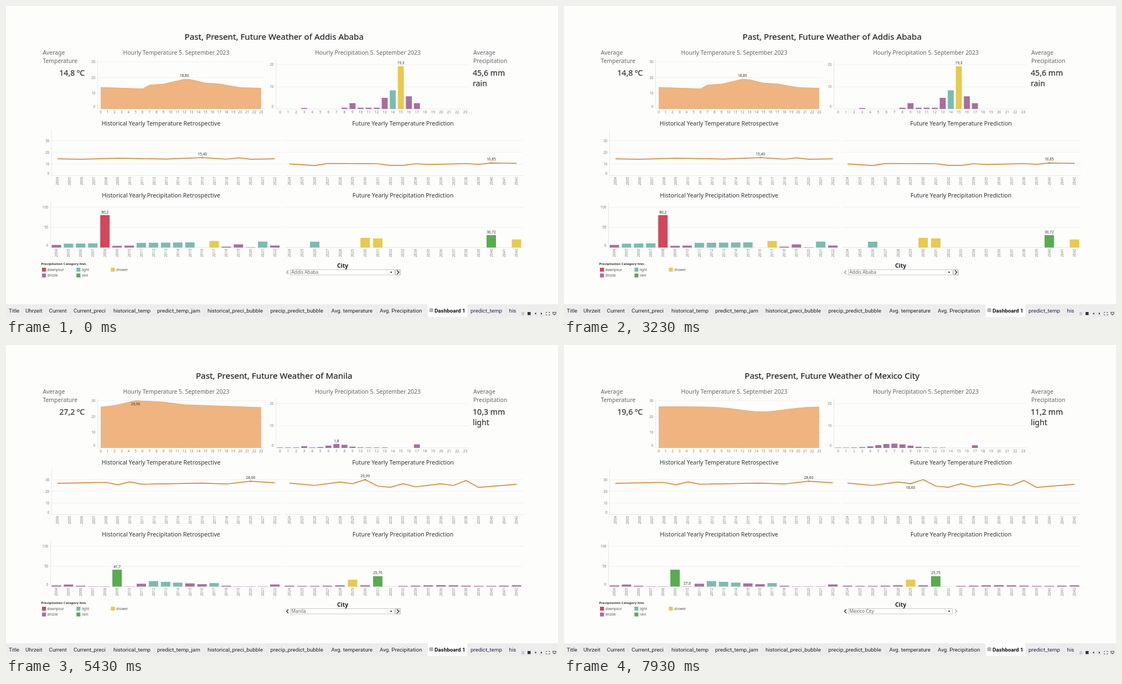
Write an HTML page that moves like this. It is 997 px wide and 562 px high and loops after 8000 ms.

```html
<!DOCTYPE html>
<html lang="en">
<head>
<meta charset="utf-8">
<title>Weather dashboard</title>
<style>
  html, body { margin: 0; width: 100%; height: 100%; overflow: hidden; background: #fdfdfc; }
  svg { display: block; width: 100%; height: 100%; }
  text { font-family: "Noto Sans", "Open Sans", sans-serif; fill: #333; }
  .title { font-size: 15.2px; fill: #222; stroke: #222; stroke-width: .2; }
  .head { font-size: 10.5px; }
  .soft { font-size: 10.35px; fill: #666; }
  .big { font-size: 14.2px; stroke: #333; stroke-width: .2; }
  .axis { font-size: 6.4px; fill: #808080; }
  .mark { font-size: 6.5px; }
  .legend { font-size: 6.2px; fill: #555; }
  .caption { font-size: 6px; font-weight: 600; }
  .bold { font-size: 10.3px; font-weight: 600; fill: #222; }
  .city { font-size: 8.3px; fill: #666; }
  .tab { font-family: Roboto, "Liberation Sans", sans-serif; font-size: 9.8px; fill: #222; }
  .active { font-weight: 700; fill: #111; }
  .blue { fill: #26264a; }
  .mid { text-anchor: middle; }
  .end { text-anchor: end; }
  .grid { stroke: #f0f0f2; }
  .base { stroke: #e8e8ea; }
  .line { fill: none; stroke: #de8a35; stroke-width: 1.7; stroke-linejoin: round; }
  .edge { fill: none; stroke: #eda866; }
</style>
</head>
<body>
<svg id="stage" viewBox="0 0 997 562"></svg>
<script>
const stage = document.getElementById('stage');
const LOOP = 8000;
const FIRST = 3420, SECOND = 3610, SETTLED = 3910, NEXT = 7800;
const HOURS = 24, YEARS = 19;
const COLORS = {
  drizzle: [168, 111, 158], light: [122, 188, 176], shower: [231, 202, 79],
  rain: [88, 173, 80], downpour: [209, 71, 91]
};
const rgb = c => `rgb(${c.map(Math.round)})`;

function add(tag, attrs, parent = stage) {
  const node = document.createElementNS('http://www.w3.org/2000/svg', tag);
  set(node, attrs);
  return parent.appendChild(node);
}
function set(node, attrs) {
  for (const key in attrs) node.setAttribute(key, attrs[key]);
}
function text(x, y, content, cls, extra = {}) {
  const node = add('text', { x, y, class: cls, ...extra });
  node.textContent = content;
  return node;
}
const rect = (x, y, width, height, fill, extra = {}) =>
  add('rect', { x, y, width, height, fill, ...extra });
const hline = (x1, x2, y, cls = 'grid') => add('path', { d: `M${x1} ${y}H${x2}`, class: cls });
const vline = (x, y1, y2, cls = 'base') => add('path', { d: `M${x} ${y1}V${y2}`, class: cls });
const stroke = (d, color, width = 1) => add('path', { d, fill: 'none', stroke: color, 'stroke-width': width });

const lerp = (a, b, p) => a + (b - a) * p;
const ease = p => p * p * (3 - 2 * p);
const progress = (t, start, end) => ease(Math.min(1, Math.max(0, (t - start) / (end - start))));
const current = (steps, t) => steps.filter(s => s[0] <= t).pop();
const bell = (x, center, width) => Math.exp(-(((x - center) / width) ** 2));

// A rule for every index, with a few standout values.
const series = (n, rule, peaks = {}) => Array.from({ length: n }, (_, i) => peaks[i] ?? rule(i));

// Straight runs between the turning points {index: value}.
function curve(n, points) {
  const keys = Object.keys(points).map(Number);
  return series(n, i => {
    const b = keys.find(k => k > i), a = keys.filter(k => k < i).pop();
    return lerp(points[a], points[b], (i - a) / (b - a));
  }, points);
}

function category(v) {
  if (v < 8.2) return COLORS.drizzle;
  if (v < 16) return COLORS.light;
  if (v < 25) return COLORS.shower;
  return v < 50 ? COLORS.rain : COLORS.downpour;
}

const hourX = { x: 171, step: 12.6 }, rainX = { x: 495, step: 14.54 };
const pastX = { x: 93, step: 21.8 }, pastBarX = { x: 91, step: 21.92 };
const futureX = { x: 512, step: 22.78 };
const hourlyMoves = [[FIRST, FIRST + 300], [NEXT, 7930]];
const ABOVE_BAR = -5.8, ABOVE_LINE = -6.6;

// moves: [start, end] of each change to the next row; labels: [time, index, text, offset]
const charts = [
  {
    kind: 'area', ...hourX, base: 186, unit: 2.84,
    rows: [
      curve(HOURS, { 0: 13.7, 6: 12.8, 7: 15.2, 9: 15.8, 12: 18.9, 13: 18.6, 15: 16.5, 17: 15.9, 20: 13.6, 23: 13.2 }),
      curve(HOURS, { 0: 26, 2: 27, 5: 30.1, 9: 29.2, 12: 27.5, 23: 25.7 }),
      series(HOURS, h => 26.2 - 3.2 * bell(h, 14.8, 4.5))
    ],
    moves: hourlyMoves,
    labels: [[0, 12, '18,80', -7], [FIRST], [SETTLED, 5, '29,90', 5.8], [NEXT]]
  },
  {
    kind: 'bars', ...rainX, base: 186, unit: 4, width: 10.8,
    rows: [
      series(HOURS, h => h > 7 && h < 13 ? .55 : 0, { 3: .4, 9: 2.6, 13: 5, 14: 8.4, 15: 19.3, 16: 5.7, 17: 2.6 }),
      series(HOURS, h => h < 14 ? .2 + 1.6 * bell(h, 7.2, 1.5) : 0, { 3: .8, 17: 1.6 }),
      series(HOURS, h => h < 14 ? .15 + 1.8 * bell(h, 6.8, 2.6) : 0, { 17: 1.2 })
    ],
    moves: hourlyMoves,
    labels: [[0, 15, '19,3', ABOVE_BAR], [FIRST, 7, '1,8', ABOVE_BAR], [NEXT]]
  },
  {
    kind: 'line', ...pastX, base: 306.5, unit: 2.11,
    rows: [
      curve(YEARS, { 0: 14.4, 2: 14, 5: 14.9, 9: 14.2, 12: 15.4, 14: 14.1, 15: 15.2, 16: 14, 18: 14.4 }),
      curve(YEARS, { 0: 26.8, 4: 27.6, 5: 25.5, 6: 28, 7: 26, 12: 27, 14: 26.2, 16: 28.6, 18: 27.3 })
    ],
    moves: [[SECOND, SETTLED]],
    labels: [[0, 12, '15,40', ABOVE_LINE], [SECOND, 16, '28,60', ABOVE_LINE]]
  },
  {
    kind: 'line', ...futureX, base: 306.5, unit: 2.11,
    rows: [
      curve(YEARS, { 0: 10, 2: 8.6, 3: 10.4, 7: 10.2, 8: 8.7, 9: 8.7, 10: 10.2, 11: 9.5, 14: 10.3, 15: 9.7, 16: 10.85, 18: 10.5 }),
      curve(YEARS, { 0: 27, 2: 25, 4: 27.9, 5: 26.5, 6: 30, 7: 24.4, 8: 23.4, 9: 26.5, 10: 23.8, 12: 26.4, 13: 25, 14: 29.2, 15: 23.3, 18: 26 })
    ],
    moves: [[SECOND, SETTLED]],
    labels: [[0, 16, '10,85', ABOVE_LINE], [SECOND], [SETTLED, 6, '29,99', ABOVE_LINE], [NEXT, 5, '18,60', 6.6]]
  },
  {
    kind: 'bars', ...pastBarX, base: 436.5, unit: .73, width: 17,
    rows: [
      series(YEARS, i => 9.3 + .32 * i, { 0: 6.5, 4: 80.2, 5: 4.3, 6: 4.8, 12: 0, 13: 16.3, 14: 2.3, 15: 7.8, 16: .8, 18: 5 }),
      series(YEARS, i => i > 7 && i < 15 ? 13.5 - 1.9 * (i - 8) : .6, { 0: 2.8, 1: 5, 2: 2, 5: 41.7, 7: 7, 13: 8.6, 18: 5.2 })
    ],
    moves: [[FIRST, FIRST + 300]],
    labels: [[0, 4, '80,2', ABOVE_BAR], [FIRST, 5, '41,7', ABOVE_BAR], [NEXT, 6, '27,6', ABOVE_BAR]]
  },
  {
    kind: 'bars', ...futureX, base: 436.5, unit: .73, width: 17,
    rows: [
      series(YEARS, () => 0, { 2: 14.5, 6: 24, 7: 22.5, 16: 30.72, 18: 20 }),
      series(YEARS, i => 2.5 + Math.sin(i * .9 - 9.2), { 5: 17, 7: 25.75, 8: 0 })
    ],
    moves: [[SECOND, SETTLED]],
    labels: [[0, 16, '30,72', ABOVE_BAR], [SECOND, 7, '25,75', ABOVE_BAR]]
  }
];

const cities = [
  [0, 'Addis Ababa', '14,8 ºC', '45,6 mm', 'rain'],
  [FIRST, 'Manila', '27,2 ºC', '10,3 mm', 'light'],
  [NEXT, 'Mexico City', '19,6 ºC', '11,2 mm', 'light']
];

function drawHeadings() {
  text(307.5, 88, 'Hourly Temperature 5. September 2023', 'soft mid');
  text(653.5, 88, 'Hourly Precipitation 5. September 2023', 'soft mid');
  ['Temperature', 'Precipitation'].forEach((name, i) => {
    const x = i ? 844 : 66.5, y = 215.7 + i * 130.2;
    text(x, 88, 'Average', 'soft');
    text(x, 103, name, 'soft');
    text(280, y, `Historical Yearly ${name} Retrospective`, 'head mid');
    text(717, y, `Future Yearly ${name} Prediction`, 'head mid');
  });
}

function drawScale(left, right, base, unit, step, max, labelX) {
  for (let v = 0; v <= max; v += step) {
    const y = base - v * unit;
    hline(left, right, y, v ? 'grid' : 'base');
    if (labelX) text(labelX, v ? y + 2.4 : base - 2, v, 'axis end');
  }
}

function drawYears(axis, first, y) {
  for (let i = 0; i < YEARS; i++) {
    const transform = `translate(${axis.x + i * axis.step} ${y}) rotate(-90)`;
    text(0, 2.4, first + i, 'axis mid', { transform });
  }
}

function drawAxes() {
  drawScale(165, 468, 186, 2.84, 10, 30, 161.5);
  drawScale(487, 836, 186, 4, 10, 20, 483.5);
  drawScale(82, 497, 306.5, 2.11, 10, 30, 78.5);
  drawScale(503, 934, 306.5, 2.11, 10, 30);
  drawScale(80, 497, 436.5, .73, 50, 100, 76.5);
  drawScale(503, 934, 436.5, .73, 50, 100);
  vline(165.5, 97, 186);
  vline(487.5, 97, 186);
  vline(82.5, 224, 306.5);
  vline(80.5, 354, 436.5);

  for (const { x, step } of [hourX, rainX])
    for (let h = 0; h < HOURS; h++) text(x + h * step, 194, h, 'axis mid');
  drawYears(pastX, 2004, 316.5);
  drawYears(futureX, 2024, 316.5);
  drawYears(pastBarX, 2004, 446.5);
  drawYears(futureX, 2024, 446.5);
}

function drawLegend() {
  text(63.5, 468, 'Precipitation Category hist.', 'caption');
  ['downpour', 'drizzle', 'light', 'rain', 'shower'].forEach((name, i) => {
    const x = 65 + 62.2 * (i >> 1), y = 473 + 10.5 * (i % 2);
    rect(x, y, 7.2, 7, rgb(COLORS[name]));
    text(x + 9.7, y + 5.9, name, 'legend');
  });
}

function drawTabs() {
  rect(0, 539, 997, 23, '#ededed');
  rect(761, 539, 73, 23, '#fff');
  const tabs = [['Title', 5], ['Uhrzeit', 35], ['Current', 77.5], ['Current_preci', 122], ['historical_temp', 194],
    ['predict_temp_jam', 273], ['historical_preci_bubble', 364], ['precip_predict_bubble', 477.5],
    ['Avg. temperature', 587.5], ['Avg. Precipitation', 675], ['Dashboard 1', 774, 'active'],
    ['predict_temp', 839, 'blue'], ['his', 908.5, 'blue']];
  tabs.forEach(([name, x, cls = ''], i) => {
    if (i) vline(x - (cls === 'active' ? 13 : 5), 540, 561);
    text(x, 553.7, name, `tab ${cls}`);
  });
  stroke('M765.5 547H771V552.5H765.5ZM768.2 547V552.5M765.5 549.7H771', '#666', .8);
  stroke('M931 554H936M931 556H936M931 558H936', '#aaa');
  rect(942, 553, 5.5, 5.5, '#333');
  add('path', { d: 'M957.5 553.7V557.7L954.8 555.7ZM966 553.7V557.7L968.7 555.7Z', fill: '#333' });
  stroke('M975.5 555V553.5H977.5M980 553.5H982V555M982 557V558.5H980M977.5 558.5H975.5V557', '#555', .9);
  stroke('M987 553.5H994M988 553.5V557H993V553.5M990.5 557V559', '#444', .9);
}

function drawSelector() {
  text(608, 472.7, 'City', 'bold mid');
  rect(513.5, 476.5, 188, 9.5, '#fff', { stroke: '#c8c8c8' });
  vline(688.5, 477, 486);
  add('path', { d: 'M693.5 480.2H697.7L695.6 482.8Z', fill: '#222' });
  return {
    frame: rect(703.5, 476.5, 8.5, 9.5, '#f4f4f4', { stroke: '#aaa' }),
    back: stroke('M510 477.8L506.7 481.2L510 484.6', '#999', 1.3),
    forward: stroke('M706.3 477.8L709.7 481.2L706.3 484.6', '#333', 1.3),
    city: text(515.5, 484.1, '', 'city')
  };
}

function buildChart(chart) {
  const { kind, rows, x, step, width } = chart;
  if (kind === 'bars') {
    chart.bars = rows[0].map((_, i) => rect(x + i * step - width / 2, 0, width, 0, 'none'));
  } else if (kind === 'area') {
    chart.fill = add('path', { fill: '#efb480' });
    chart.path = add('path', { class: 'edge' });
  } else {
    chart.path = add('path', { class: 'line' });
    chart.dot = add('circle', { r: 1.5, fill: '#de8a35' });
  }
  chart.label = text(0, 0, '', 'mark mid');
}

function drawChart(chart, t) {
  const { rows, moves, base, unit, x, step } = chart;
  const move = moves.length > 1 && t >= moves[1][0] ? 1 : 0;
  const p = progress(t, ...moves[move]);
  const from = rows[move], to = rows[move + 1];
  const values = from.map((v, i) => lerp(v, to[i], p));
  const px = i => x + i * step, py = i => base - values[i] * unit;

  if (chart.bars) {
    chart.bars.forEach((bar, i) => {
      const a = category(from[i]), b = category(to[i]);
      set(bar, { y: py(i), height: values[i] * unit, fill: rgb(a.map((c, k) => lerp(c, b[k], p))) });
    });
  } else {
    const d = 'M' + values.map((_, i) => `${px(i)} ${py(i).toFixed(2)}`).join('L');
    set(chart.path, { d });
    if (chart.fill) set(chart.fill, { d: `${d}V${base}H${x}Z` });
  }

  const [, index, caption = '', offset] = current(chart.labels, t);
  chart.label.textContent = caption;
  if (caption) set(chart.label, { x: px(index), y: py(index) + offset + 2.4 });
  if (chart.dot) set(chart.dot, caption ? { cx: px(index), cy: py(index), opacity: 1 } : { opacity: 0 });
}

drawHeadings();
drawAxes();
charts.forEach(buildChart);
drawLegend();
drawTabs();
const selector = drawSelector();
const title = text(484.2, 61, '', 'title mid');
const temperature = text(142.3, 126.2, '', 'big end');
const amount = text(843, 126.2, '', 'big');
const kind = text(843, 145.2, '', 'big');

function render(t) {
  const state = current(cities, t);
  const [, name, degrees, millimetres, type] = state;
  title.textContent = `Past, Present, Future Weather of ${name}`;
  temperature.textContent = degrees;
  amount.textContent = millimetres;
  kind.textContent = type;
  selector.city.textContent = name;
  const isFirst = state === cities[0], isLast = state === cities[2];
  set(selector.back, { stroke: isFirst ? '#999' : '#222' });
  set(selector.forward, { stroke: isLast ? '#aaa' : '#222' });
  set(selector.frame, { opacity: isLast ? 0 : 1 });
  charts.forEach(chart => drawChart(chart, t));
}

const started = performance.now();
function tick() {
  render((performance.now() - started) % LOOP);
  requestAnimationFrame(tick);
}
tick();
</script>
</body>
</html>
```
